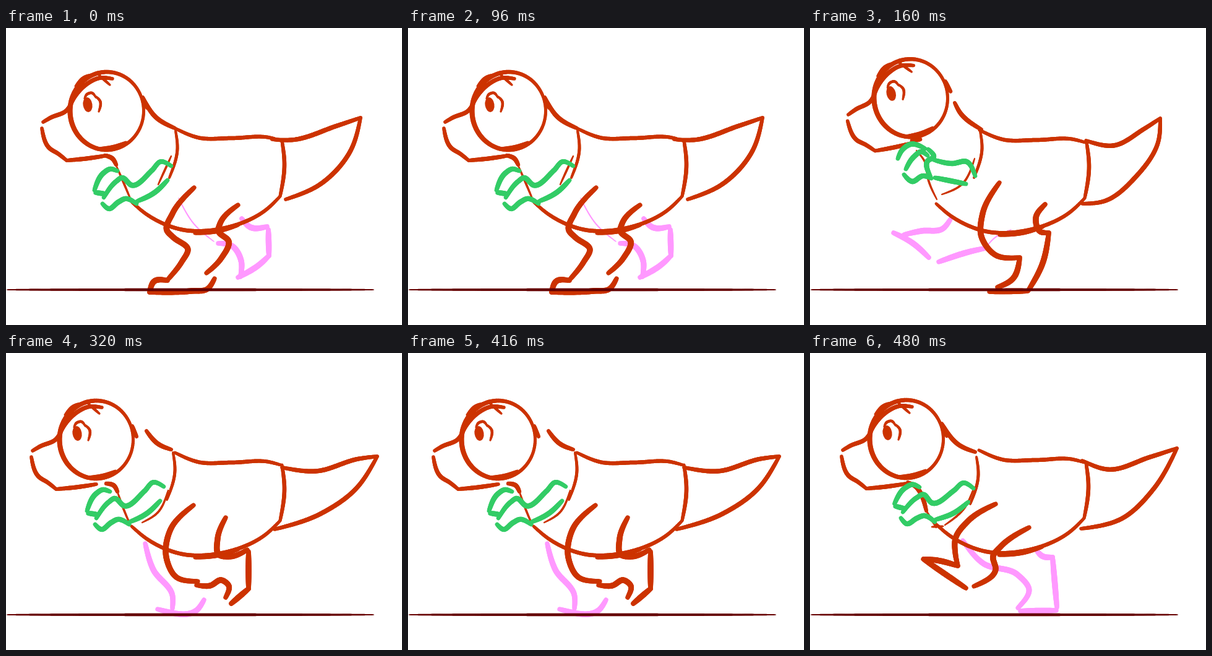
These frames come from a looping animation (640x480 px, 0.64 s). An HTML page with a canvas:

```html
<!DOCTYPE html>
<html lang="en">
<head>
<meta charset="utf-8">
<title>Running dinosaur sketch</title>
<style>
  html, body { margin: 0; width: 100%; height: 100%; overflow: hidden; background: #fff; }
  canvas { display: block; }
</style>
</head>
<body>
<canvas id="stage" width="640" height="480"></canvas>
<script>
const RED = '#cc3300', GREEN = '#33cc66', PINK = '#ff99ff', SOIL = '#660000';
const HOLD = 160;
const ctx = document.getElementById('stage').getContext('2d');

// Shared parts: each string is one brush stroke through a few key points.
const face = [
  '101,133 112,110 130,91 150,81 172,82',
  '60,152 72,145 98,133 106,120',
  '58,162 70,194 84,203 98,214',
  '98,214 130,211 163,206',
  '221,112 224,120 228,129'
];
const brow = [
  '112,94 125,80 152,75',
  '150,76 168,92',
  '194,184 174,191 150,194',
  '127,114 131,107 139,105 145,112',
  '144,110 152,118 150,135'
];
const trunk = [
  '273,162 310,177 365,178 425,177 444,182',
  '446,182 450,220 443,272',
  '203,281 230,303 285,326 350,324 420,294 443,272',
  '305,332 345,328 375,319'
];
const collar = ['274,166 277,195 264,242'];
const scarf = [
  '143,262 158,234 168,228 180,231',
  '145,266 160,268',
  '158,274 178,248 187,242 203,254 236,230 250,216 267,223',
  '156,284 166,292 182,281 192,276 211,284',
  '212,280 240,266 261,246'
];
const bow = [
  '142,211 150,196 162,188 186,195',
  '155,228 168,208 180,200 190,206',
  '191,196 200,208 190,215 195,241',
  '152,237 165,248 183,239 196,243',
  '200,213 230,219 253,216 267,239',
  '202,242 252,252'
];

// Placements are [dx, dy, turn in degrees].
const poses = [
  {
    head: [0, 0, 0], trunk: [0, 0, 0], collar: [0, 0, 0], scarf: [0, 0, 0], cloth: scarf,
    neck: ['222,114 242,144 273,162', '160,206 172,211 178,221'],
    thin: ['178,222 193,257 203,281', '267,207 246,253'],
    tail: ['430,180 460,181 535,158 573,145', '573,145 557,198 510,251 452,277'],
    hair: ['279,275 305,318 336,345'],
    far: ['343,348 365,352 380,376 379,402', '375,403 410,382 425,368', '425,368 424,326', '422,321 395,322 381,308'],
    near: [
      '304,258 269,300 260,327 270,338 294,358 284,378 261,407',
      '261,408 240,409 232,427', '232,427 300,425 325,422 337,405',
      '375,286 346,316 343,327 360,345 348,372 324,396'
    ]
  },
  {
    head: [1, -18, -5], trunk: [1, 3, 0], collar: [1, 0, 0], scarf: [0, 0, 0], cloth: bow,
    neck: ['234,121 242,136 277,164', '165,182 178,180'],
    thin: ['172,198 188,222 190,240 205,277', '213,269 245,253 266,211'],
    tail: ['446,182 490,190 540,163 566,146', '566,146 563,183 527,240 475,280 440,284'],
    hair: ['283,356 300,338 325,326'],
    far: ['227,309 215,324 180,328 152,334', '135,331 165,347 192,371', '208,378 260,361 283,356'],
    near: [
      '306,250 279,300 277,337 300,367 339,371', '339,371 328,405 303,419', '290,426 352,425',
      '380,285 365,307 372,329 386,331', '386,331 376,380 353,424'
    ]
  },
  {
    head: [-17, 6, 0], trunk: [0, -1, 0], collar: [-4, -5, 0], scarf: [-12, -7, 0], cloth: scarf,
    neck: ['227,126 246,147 267,156', '162,211 174,214 180,224'],
    thin: ['180,224 194,262 202,280', '262,222 245,258 220,274'],
    tail: ['446,185 500,191 570,171 600,167', '600,167 565,220 510,259 434,285'],
    hair: [],
    far: ['225,308 238,350 269,392 269,413', '245,414 310,414 320,399'],
    near: [
      '303,246 266,285 259,330 275,362 310,369', '308,375 330,376 348,367 360,376 355,395',
      '364,405 392,381', '392,381 392,321', '355,266 342,300 344,326 362,329 390,318'
    ]
  },
  {
    head: [-7, 5, 0], trunk: [0, -5, 0], collar: [-5, 2, 0], scarf: [-6, -12, 6.5], cloth: scarf,
    neck: ['213,114 240,148 267,160', '158,209 168,214 188,255'],
    thin: ['188,255 204,282', '197,281 215,280', '264,220 250,250 218,278'],
    tail: ['440,174 480,188 550,168 593,154', '593,154 555,220 505,267 438,284'],
    hair: [],
    far: ['247,303 280,340 335,358 354,382 336,412', '340,417 398,416', '367,320 375,328 392,330', '392,330 399,411'],
    near: [
      '300,244 255,272 235,300 235,325 239,344', '239,344 205,335 184,333', '183,333 215,355 252,380',
      '354,282 308,313 296,328 300,350 265,377'
    ]
  }
];

const parse = path => path.split(' ').map(p => p.split(',').map(Number));
const mix = (a, b, k) => a.map((v, i) => v + (b[i] - v) * k);

// Smooth curve through the points, sampled about every two pixels.
function curve(pts) {
  const last = pts.length - 1;
  const len = [], dir = [];
  for (let i = 0; i < last; i++) {
    const [dx, dy] = [pts[i + 1][0] - pts[i][0], pts[i + 1][1] - pts[i][1]];
    len[i] = Math.hypot(dx, dy);
    dir[i] = [dx / len[i], dy / len[i]];
  }
  const slope = pts.map((p, i) => i > 0 && i < last
    ? mix(dir[i - 1], dir[i], len[i - 1] / (len[i - 1] + len[i])) : null);
  slope[0] = mix(slope[1] || dir[0], dir[0], 1.5);
  slope[last] = mix(slope[last - 1], dir[last - 1], 1.5);

  const out = [pts[0]];
  for (let i = 0; i < last; i++) {
    const steps = Math.ceil(len[i] / 2);
    for (let s = 1; s <= steps; s++) {
      const t = s / steps, u = 1 - t;
      out.push([0, 1].map(k =>
        u * u * (1 + 2 * t) * pts[i][k] + t * t * (3 - 2 * t) * pts[i + 1][k]
        + len[i] * t * u * (u * slope[i][k] - t * slope[i + 1][k])));
    }
  }
  return out;
}

function brush(pts, width) {
  for (let i = 1; i < pts.length; i++) {
    ctx.lineWidth = width(i / pts.length);
    ctx.beginPath();
    ctx.moveTo(...pts[i - 1]);
    ctx.lineTo(...pts[i]);
    ctx.stroke();
  }
}

// Pressure is lightest at both ends of a stroke.
function layer(color, size, paths, ends = 0.7) {
  ctx.strokeStyle = color;
  const width = t => size * (ends + (1 - ends) * Math.sqrt(Math.sin(Math.PI * t)));
  paths.forEach(path => brush(curve(parse(path)), width));
}

function placed([dx, dy, turn], px, py, paint) {
  ctx.save();
  ctx.translate(px + dx, py + dy);
  ctx.rotate(turn * Math.PI / 180);
  ctx.translate(-px, -py);
  paint();
  ctx.restore();
}

function drawHead() {
  const ring = Array.from({ length: 121 }, (_, i) => {
    const a = i / 60 * Math.PI;
    return [163 + 59.5 * Math.cos(a), 134 + 63 * Math.sin(a)];
  });
  ctx.strokeStyle = RED;
  brush(ring, t => 6.5 - 1.5 * Math.cos(2 * Math.PI * t));
  layer(RED, 7, face);
  layer(RED, 4.5, brow, 0.5);
  ctx.fillStyle = RED;
  ctx.beginPath();
  ctx.ellipse(132, 124, 7.5, 12, -0.15, 0, 2 * Math.PI);
  ctx.fill();
}

function draw(pose) {
  ctx.fillStyle = '#fff';
  ctx.fillRect(0, 0, 640, 480);
  ctx.lineCap = 'round';
  layer(PINK, 2, pose.hair);
  layer(PINK, 9.5, pose.far);
  layer(RED, 7.5, pose.tail);
  placed(pose.trunk, 0, 0, () => layer(RED, 6.5, trunk));
  placed(pose.collar, 0, 0, () => layer(RED, 5, collar));
  layer(RED, 7.5, pose.neck);
  layer(RED, 3.5, pose.thin, 0.5);
  placed(pose.head, 130, 145, drawHead);
  layer(RED, 9.5, pose.near);
  placed(pose.scarf, 200, 255, () => layer(GREEN, 8.5, pose.cloth));
  layer(SOIL, 4.5, ['2,423 594,423'], 0.3);
}

const start = performance.now();
let shown = -1;

function tick() {
  const index = Math.floor((performance.now() - start) / HOLD) % poses.length;
  if (index !== shown) {
    shown = index;
    draw(poses[index]);
  }
  requestAnimationFrame(tick);
}
tick();
</script>
</body>
</html>
```
